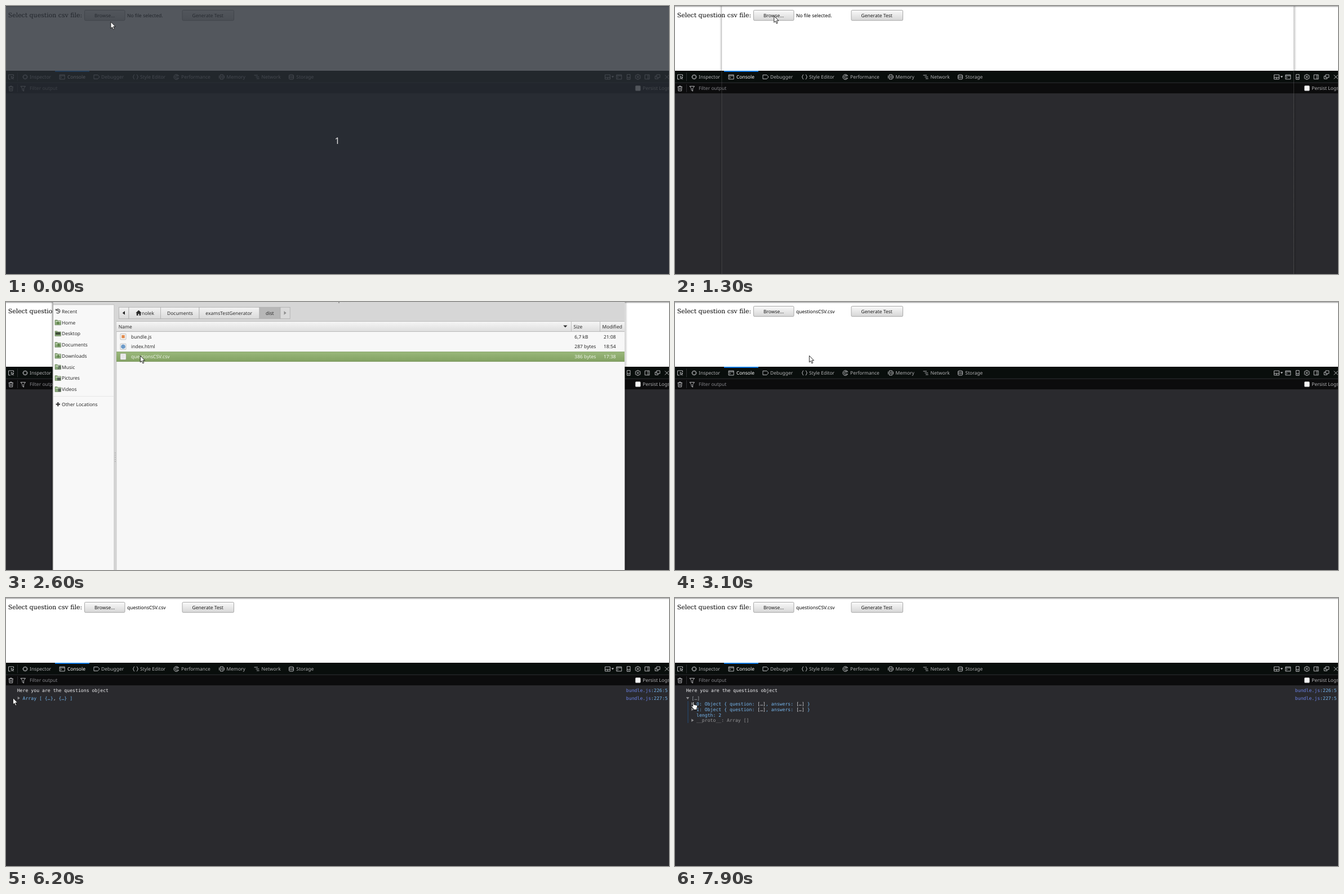
These frames come from a looping animation (1177 px wide and 476 px high, 8 s). An HTML page:

```html
<!DOCTYPE html>
<html lang="en">
<head>
<meta charset="utf-8">
<title>Question file upload</title>
<style>
html, body { margin: 0; width: 100%; height: 100%; overflow: hidden; background: #2a2a2e; }
svg { display: block; width: 1177px; height: 476px; }
text { font: 8.5px "Noto Sans", "Open Sans", sans-serif; text-rendering: geometricPrecision; white-space: pre; }
.serif { font: 10.95px "DejaVu Serif", "Noto Serif", serif; }
.mono { font: 8.18px "DejaVu Sans Mono", monospace; }
.title { font-weight: bold; }
.digit { font-size: 16px; }
.ico { fill: none; stroke: #c9c9cc; stroke-width: .9; }
</style>
</head>
<body>
<svg id="stage" viewBox="0 0 1177 476" xmlns="http://www.w3.org/2000/svg"></svg>
<script>
const LOOP = 8000;

const rect = (x, y, w, h, fill, extra = '') =>
  `<rect x="${x}" y="${y}" width="${w}" height="${h}" fill="${fill}" ${extra}/>`;
const text = (x, y, str, fill = '#000', cls = '', extra = '') =>
  `<text x="${x}" y="${y}" fill="${fill}" class="${cls}" ${extra}>${str}</text>`;
const span = (fill, str) => `<tspan fill="${fill}">${str}</tspan>`;
const path = (d, fill, extra = '') => `<path d="${d}" fill="${fill}" ${extra}/>`;
const icon = (x, y, d) => `<path class="ico" transform="translate(${x} ${y})" d="${d}"/>`;
const group = (id, body) => `<g id="${id}">${body}</g>`;
const fade = (id, a, b, dir = 'x2="0" y2="1"') =>
  `<linearGradient id="${id}" x1="0" y1="0" ${dir}><stop stop-color="${a}"/><stop offset="1" stop-color="${b}"/></linearGradient>`;
const clear = 'rgba(0,0,0,0)', shade = 'rgba(0,0,0,.2)';

const defs = `<defs>${
  fade('btn', '#fafafa', '#d6d6d6') + fade('down', '#b4b4b4', '#cfcfcf') +
  fade('crumb', '#f3f3f3', '#dadada') + fade('head', '#f6f6f6', '#dedede') +
  fade('pick', '#9ab87b', '#82a162') +
  fade('shL', clear, shade, 'x2="1" y2="0"') + fade('shR', shade, clear, 'x2="1" y2="0"')
}</defs>`;

const button = (x, w, label, tx, fill = 'url(#btn)') =>
  rect(x, 7.5, w, 18.2, fill, 'rx="1.8" stroke="#a0a0a0" stroke-width=".9"') +
  text(tx, 19.6, label, '#1a1a1a');

// Web page above the developer tools
const page =
  rect(0, 0, 1177, 116, '#fff') + rect(0, 0, 1177, 1.7, '#b9b9b9') +
  text(3.7, 20, 'Select question csv file:', '#000', 'serif') +
  button(139.5, 71.5, 'Browse...', 157) +
  group('noFile', text(215, 19.6, 'No file selected.')) +
  group('hasFile', text(215, 19.6, 'questionsCSV.csv')) +
  button(313, 91.5, 'Generate Test', 330.6) +
  group('pressed', button(313, 91.5, 'Generate Test', 330.6, 'url(#down)'));

// Developer tools: icons are drawn around their own centre
const consoleBox = 'M-4.5-3.8H4.5V4H-4.5ZM-4.5-2H4.5M-3-.4L-1.4 1L-3 2.4';
const tabs = [
  [34, 42, 'Inspector', 'M-3-3H3V3H-3ZM-3 0H-5M3 0H5M0-3V-4.6M0 3V4.6'],
  [99.7, 109, 'Console', consoleBox],
  [161, 169, 'Debugger', 'M-5-3.5H2L5 0L2 3.5H-5Z'],
  [230, 238, 'Style Editor', 'M-1.8-4C-4.4-4-2.5-.2-4.8 0C-2.5.2-4.4 4-1.8 4M1.8-4C4.4-4 2.5-.2 4.8 0C2.5.2 4.4 4 1.8 4'],
  [302.4, 311, 'Performance', 'M4.4-1A4.5 4.5 0 1 0 4 2.2M2.3-1.2A2.4 2.4 0 1 0 1.8 1.7M0 0L3.6-3.2M1.5 2H4.6'],
  [383, 391.5, 'Memory', 'M-2.4-4H2.4V4H-2.4ZM-4.5-2.5V2.5M4.5-2.5V2.5M0-2V2'],
  [445, 453.5, 'Network', 'M-4.4-3H2M-1.5 0H4.2M0 3H4.6'],
  [506.5, 515.3, 'Storage', 'M-4-2.5C-4-4.6 4-4.6 4-2.5V3C4 4.8-4 4.8-4 3ZM-4-2.5C-4-.8 4-.8 4-2.5M-4 .3C-4 2 4 2 4 .3']
];
const tools = [
  [9, 'M4.5-1V-4H-4.5V4H-1M0-1L5 1L2.8 2L4.6 4.4M0-1L1.4 4L2.8 2'],
  [1068, 'M-4.5-3.8H4.5V4H-4.5ZM-4.5 .8H4.5M0 .8V4'],
  [1088.3, consoleBox],
  [1105.3, 'M-2.8-4.4H2.8V4.4H-2.8ZM-2.8 1H2.8M-.6 2.8H.8'],
  [1121.7, 'M-1.2-4.4H1.2L1.8-3L3.6-3.2L4.6-1L3.6 0L4.6 1.2L3.6 3.2L1.8 3L1.2 4.4H-1.2L-1.8 3L-3.6 3.2L-4.6 1.2L-3.6 0L-4.6-1L-3.6-3.2L-1.8-3ZM1.4 0A1.4 1.4 0 1 0-1.4 0A1.4 1.4 0 1 0 1.4 0'],
  [1138.2, 'M-4-3.8H4V3.8H-4ZM1.5-3.8V3.8'],
  [1156.5, 'M-1.5-4H4.4V1H-1.5ZM-1.5-1.5H-4.2V3.4H1.2V1'],
  [1173.3, 'M-3.5-3.5L3.5 3.5M3.5-3.5L-3.5 3.5']
];
const devtools =
  rect(0, 115, 1177, 41, '#0c0c0d') + rect(0, 115, 1177, 21, '#090e0c') +
  rect(0, 135.8, 1177, .9, '#333338') + rect(0, 155.4, 1177, .9, '#38383d') +
  rect(0, 156, 1177, 320, '#2a2a2e') +
  rect(87, 115, 61, 1.8, '#0a84ff') +
  rect(20.2, 118.5, .8, 15, '#38383d') + rect(20.2, 139, .8, 14, '#38383d') +
  tabs.map(([x, tx, label, d], i) =>
    icon(x, 126, d) + text(tx, 129, label, i === 1 ? '#fff' : '#b1b1b3')).join('') +
  tools.map(([x, d]) => icon(x, 126, d)).join('') +
  path('M1074.6 124.5H1079.4L1077 127.2Z', '#c9c9cc') +
  icon(8.8, 146.4, 'M-4.2-2.8H4.2M-1.5-2.8V-4.3H1.5V-2.8M-3.2-2.8L-2.8 4.4H2.8L3.2-2.8M-1-.8V2.6M1-.8V2.6') +
  icon(30.3, 146.6, 'M-4.2-4H4.2L1.2 0V4.6L-1.2 3V0Z') +
  text(42, 149.4, 'Filter output', '#85858a') +
  rect(1117.4, 141.6, 9, 9, '#f4f4f4', 'rx="1.5" stroke="#aaa" stroke-width=".7"') +
  text(1130.3, 149.4, 'Persist Logs', '#b1b1b3');

// Console output
const blue = '#75b5ec', link = '#6b82e6', grey = '#939395', pale = '#d7d7db';
const logLine = (y, no) =>
  text(1100.8, y, span(link, 'bundle.js') + span(blue, `:${no}:5`), blue, 'mono');
const arrow = (x, y, turn = 0) =>
  path('M-1.8-2.8L2.4 0L-1.8 2.8Z', '#8b8b8e', `transform="translate(${x} ${y}) rotate(${turn})"`);
const item = (i, y) => arrow(31, y - 3) +
  text(38, y, `${i}: Object { question: ${span(pale, '[…]')}, answers: ${span(pale, '[…]')} }`, blue, 'mono');
const output =
  group('log',
    text(19.7, 166.7, 'Here you are the questions object', '#f0f0f2', 'mono') +
    logLine(166.7, 226) + logLine(180.9, 227)) +
  group('flat', arrow(22.5, 177.8) +
    text(29.5, 180.9, `Array [ {…}${span(pale, ',')} {…} ]`, blue, 'mono')) +
  group('turning', arrow(22.5, 177.8, 60)) +
  group('turned', arrow(22.5, 177.8, 90)) +
  group('open', text(29.5, 180.9, '[…]', '#a3a9b0', 'mono')) +
  group('kids',
    rect(22.6, 183, .9, 39, '#24527f') +
    item(0, 190.9) + item(1, 200.8) +
    text(38, 210.6, 'length: 2', blue, 'mono') +
    arrow(31, 217.2) + text(38, 220.3, '__proto__: Array []', grey, 'mono'));

// File dialog
const shadow = rect(79, 0, 4, 476, 'url(#shL)') + rect(1098.5, 0, 5, 476, 'url(#shR)');
const ghost = shadow + rect(82.5, 0, .9, 476, 'rgba(140,140,140,.35)') +
  rect(1098, 0, .9, 476, 'rgba(140,140,140,.35)');

const places = [[36.4, 'Home'], [56.1, 'Desktop'], [75.9, 'Documents'], [95.7, 'Downloads'],
  [115.4, 'Music'], [135.2, 'Pictures'], [155, 'Videos']];
const emblems = [
  'M92.3-2L95 .5H94V3H90.5V.5H89.5Z', 'M88-2.4H96.5V2H88Z', 'M91.5-2H95.5V3H91.5Z', 'M91.5-2H94V.5H95.5L92.8 3.4L90 .5H91.5Z',
  'M93-2H97V3.5H95V0H94V3.5H92V1.5H93Z', 'M91-1H97V4H91Z', 'M92.5-1.5H97.5V4H92.5Z'];
const folder = (y, i) => {
  const mark = path(emblems[i], i === 1 ? '#3d4a36' : i > 3 ? '#59625a' : '#5d8148');
  return `<g transform="translate(0 ${y})">` +
    path('M87-4.4H91L92-3.2H97.4V4.4H87Z', '#88a878', 'stroke="#627a55" stroke-width=".6"') +
    rect(88, -2.3, 8.8, 1.2, '#e0ead8') + mark + '</g>';
};
const sidebar =
  rect(84, 5, 108, 471, '#f8f8f8') + rect(84, 4.4, 108, .8, '#b7b7b7') + rect(191.5, 5, .9, 471, '#bdbdbd') +
  group('hover', rect(84, 7, 107.5, 19, '#efefef')) +
  path('M89.2 14A3.7 3.7 0 1 1 89.5 18.8M88 12.5L89 15.2L91.7 14.4M92.5 14V16.8H94.8', 'none', 'stroke="#3c3c3c" stroke-width="1.1"') +
  text(99, 19.6, 'Recent', '#2b2b2b') +
  places.map(([y, name], i) => folder(y, i) + text(99, y + 3.1, name, '#2b2b2b')).join('') +
  rect(84, 167.3, 107.5, .8, '#e2e2e2') +
  path('M91.2 178H93.4V180.5H96V182.7H93.4V185.3H91.2V182.7H88.6V180.5H91.2Z', '#3a3a3a') +
  text(99, 184.7, 'Other Locations', '#2b2b2b');

const crumb = (x, w, label, tx, fill = 'url(#crumb)') =>
  rect(x, 9.3, w, 20.4, fill, 'stroke="#adadad" stroke-width=".8"') +
  text(tx, 22.5, label, '#2b2b2b');
const crumbs =
  crumb(200.4, 17.6, '', 0) + crumb(218, 56.5, 'nolek', 241) + crumb(274.5, 68.5, 'Documents', 286) +
  crumb(343, 107, 'examsTestGenerator', 354.3) + crumb(450, 37, 'dist', 461, '#b7b7b7') +
  crumb(487, 17.2, '', 0, '#d9d9d9') +
  path('M211 16V22.8L206.8 19.4Z', '#222') + path('M493.5 16V22.8L497.7 19.4Z', '#8f8f8f') +
  path('M235.5 14.5L240.7 19.5H239.2V24H236.6V21H234.5V24H231.8V19.5H230.3Z', '#2a2a2a');

const files = [['bundle.js', '6,7 kB', 1009.3, '21:08'], ['index.html', '287 bytes', 1009.3, '18:54'],
  ['questionsCSV.csv', '386 bytes', 1009.3, '17:38']];
const badges = [
  rect(205.3, 58.8, 5.4, 5.4, '#e08a4c'),
  '<circle cx="208" cy="79.3" r="3.8" fill="#6d9bc9"/>',
  path('M204.8 94.5H211M204.8 96.8H211M204.8 99.1H211', 'none', 'stroke="#cfcfcf" stroke-width=".8"')];
const fileRow = (i, ink) => {
  const [name, size, sx, time] = files[i], y = 64.7 + i * 17.7;
  return rect(203, y - 8.3, 10, 10.4, '#f5f5f5', 'rx="1" stroke="#a9a9a9" stroke-width=".7"') + badges[i] +
    text(222, y, name, ink) + text(sx, y, size, ink) + text(1061, y, time, ink);
};
const picked = i => {
  const y = 53 + i * 17.7;
  return rect(196, y, 902, 17.6, 'url(#pick)') + rect(196, y, 902, .8, '#7f9c62') +
    rect(196, y + 16.9, 902, .8, '#77945a') + fileRow(i, '#eef3e8');
};
const dialog = shadow +
  rect(83, 0, 1015.5, 476, '#d6d6d6') + rect(82.6, 0, 1, 476, '#8d8d8d') +
  text(590, .4, 'File Upload', '#777', 'title', 'text-anchor="middle"') +
  sidebar + crumbs +
  rect(196, 34.5, 902, 442, '#f7f7f7') + rect(195.6, 34.5, .8, 442, '#c4c4c4') +
  rect(196, 34.6, 902, 17.8, 'url(#head)') +
  rect(196, 34.2, 902, .8, '#b5b5b5') + rect(196, 52, 902, .9, '#b5b5b5') +
  rect(1003, 35, .8, 17, '#b5b5b5') + rect(1054, 35, .8, 17, '#b5b5b5') +
  text(199.8, 46.6, 'Name', '#2b2b2b') + text(1007.6, 46.6, 'Size', '#2b2b2b') +
  text(1058.6, 46.6, 'Modified', '#2b2b2b') +
  path('M989.3 41.5H996.5L992.9 45.2Z', '#2b2b2b') +
  [0, 1, 2].map(i => fileRow(i, '#2b2b2b')).join('') +
  group('pickFirst', picked(0)) + group('pickLast', picked(2)) +
  [0, 1, 2, 3, 4].map(i => rect(193.4, 267.5 + i * 3.8, 1.2, 1.2, '#9a9a9a')).join('');

const overlay = rect(0, 0, 1177, 476, '#292d35', 'fill-opacity=".8"') +
  text(588, 244.6, '1', '#e4e4e4', 'digit', 'text-anchor="middle"');

const line = 'stroke="#111" stroke-width=".9" stroke-linejoin="round"';
const pointer =
  group('arrow', path('M.4.6V12.2L3 9.8L4.9 14.2L6.8 13.3L4.9 9.1H8.6Z', '#fff', line)) +
  group('hand', path('M3.2 1.4C3.2 .2 5.2 .2 5.2 1.4V5.4L10 6.4C11 6.7 11.3 7.2 11.2 8.2L10.3 12V14.5H4.4V12.8L.8 9C0 8 1.2 7 2.2 7.8L3.2 8.6Z', '#fff', line));

document.getElementById('stage').innerHTML = defs + page + devtools + output +
  group('ghost', ghost) + group('dialog', dialog) + group('overlay', overlay) + group('pointer', pointer);

// Visible from, until
const spans = {
  overlay: [0, 200], noFile: [0, 3100], hasFile: [3100, LOOP], pressed: [4900, 5100],
  ghost: [1200, 1400], dialog: [1400, 3100], hover: [1400, 1900],
  pickFirst: [1400, 2600], pickLast: [2600, 3100],
  log: [5100, LOOP], flat: [5100, 6900], turning: [6900, 7000], turned: [7000, LOOP],
  open: [6900, LOOP], kids: [7000, LOOP],
  arrow: [0, 6400], hand: [6400, LOOP]
};

// Pointer steps: time, x, y
const moves = [
  [0, 185.6, 27.6], [400, 180, 23], [500, 166, 15], [600, 157, 12], [700, 172, 11],
  [900, 174, 14], [1000, 175.4, 17],
  [1800, 179, 23], [1900, 198, 47], [2000, 226, 76], [2100, 247, 91], [2200, 242, 94], [2300, 238, 94.8],
  [4100, 219, 73], [4200, 252, 38], [4300, 336, 14], [4400, 391, 16], [4600, 389, 15], [4700, 387, 16],
  [5600, 386, 14], [5700, 350, 38], [5800, 264, 86], [5900, 152, 136], [6000, 58, 167],
  [6100, 2, 180], [6200, 12, 177], [6300, 14, 176.5], [6400, 16, 175.5], [6500, 16.5, 175], [6600, 17, 175],
  [7500, 18.5, 176], [7600, 21.5, 178], [7700, 25, 181], [7800, 27.5, 183], [7900, 28.5, 184]
];

const parts = Object.entries(spans).map(([id, range]) => [document.getElementById(id), ...range]);
const ghostEl = document.getElementById('ghost');
const pointerEl = document.getElementById('pointer');

function draw() {
  const t = performance.now() % LOOP;
  for (const [el, from, to] of parts) el.style.display = t >= from && t < to ? '' : 'none';
  ghostEl.style.opacity = t < 1300 ? .5 : 1;
  const [, x, y] = moves.findLast(m => m[0] <= t);
  pointerEl.setAttribute('transform', `translate(${x} ${y})`);
  requestAnimationFrame(draw);
}
draw();
</script>
</body>
</html>
```
